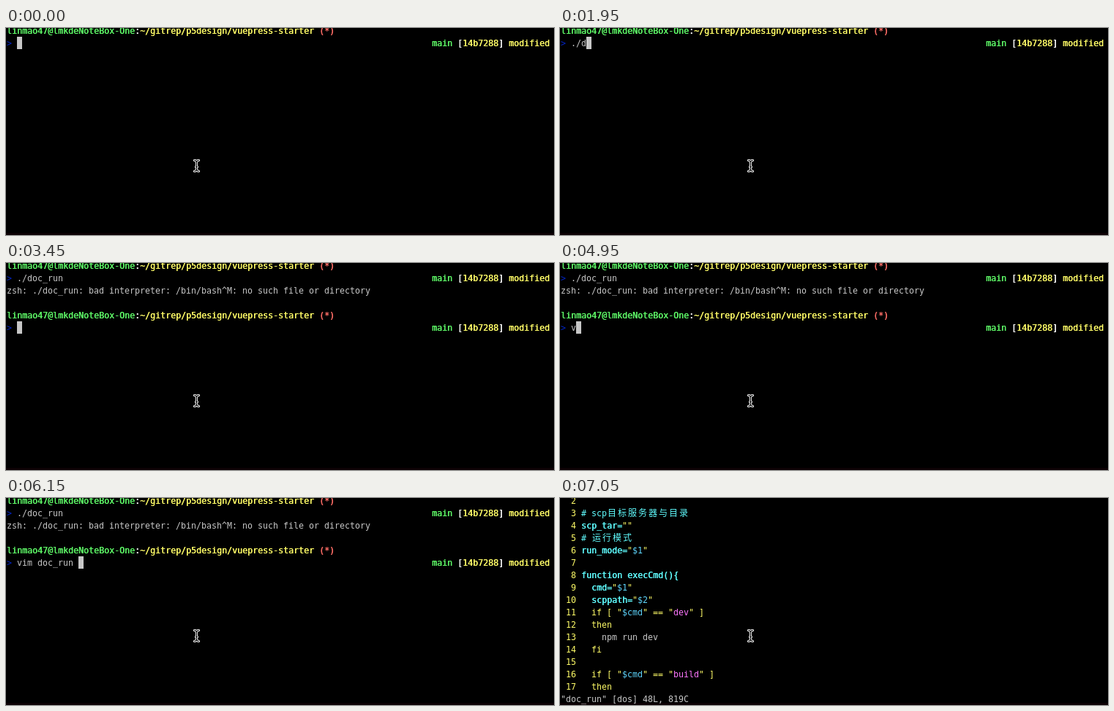
An HTML page with a canvas that plays this animation: 749 by 284 pixels, repeating every 8000 ms.

```html
<!DOCTYPE html>
<html lang="en">
<head>
<meta charset="utf-8">
<title>Terminal session</title>
<style>
  html, body { margin: 0; width: 100%; height: 100%; overflow: hidden; background: #000; }
  canvas { display: block; width: 749px; height: 284px; }
</style>
</head>
<body>
<canvas id="stage" width="749" height="284"></canvas>
<script>
const ctx = document.getElementById('stage').getContext('2d');
const LOOP = 8000, CELL = 7, LINE = 17;
const MONO = '11.63px "DejaVu Sans Mono", monospace';
const WIDE = '12px "Noto Sans CJK SC", "Noto Sans CJK", sans-serif';

// [colour, bold]
const STYLE = {
  text: ['#c7c7c7'],
  prompt: ['#0225c7'],
  user: ['#5ffa68', true],
  path: ['#fffc67', true],
  dirty: ['#ff6e67', true],
  bracket: ['#ffffff', true],
  key: ['#fffc67'],
  note: ['#60fdff'],
  name: ['#60fdff', true],
  arg: ['#5fd7ff'],
  str: ['#ff77ff']
};

const cellX = col => 1 + col * CELL;
const rowY = row => row * LINE - 5;

// Draws [style, text] pairs on the character grid.
function write(row, col, ...parts) {
  const y = rowY(row) + 13;
  for (const [style, text] of parts) {
    const [color, bold] = STYLE[style];
    ctx.fillStyle = color;
    for (const ch of text) {
      const wide = ch > '\u2e80';
      const x = cellX(col) + (wide ? 1 : 0);
      ctx.font = wide ? WIDE : MONO;
      ctx.fillText(ch, x, y);
      if (bold) ctx.fillText(ch, x + 0.5, y);
      col += wide ? 2 : 1;
    }
  }
}

function cursor(row, col) {
  ctx.fillStyle = '#c7c7c7';
  ctx.fillRect(cellX(col), rowY(row), CELL, LINE);
}

function prompt(row, command) {
  write(row, 0, ['user', 'linmao47@lmkdeNoteBox-One'], ['bracket', ':'],
    ['path', '~/gitrep/p5design/vuepress-starter '], ['dirty', '(*)']);
  write(row + 1, 0, ['prompt', '> '], ['text', command]);
  write(row + 1, 83, ['user', 'main '], ['bracket', '['], ['path', '14b7288'],
    ['bracket', '] '], ['path', 'modified']);
}

// Number of characters typed so far, from [time, count] steps.
const typed = (steps, t) => steps.reduce((n, [at, count]) => t >= at ? count : n, 0);

const RUN = './doc_run ', EDIT = 'vim doc_run ';
const RUN_STEPS = [[750, 1], [1200, 2], [1950, 3], [2250, 4], [2400, 5], [2700, 10]];
const EDIT_STEPS = [[4950, 1], [5100, 2], [5250, 3], [5400, 4], [5700, 6], [5850, 7], [6150, 12]];

function shell(t) {
  const run = typed(RUN_STEPS, t);
  prompt(0, RUN.slice(0, run));
  if (t < 3300) return cursor(1, 2 + run);
  write(2, 0, ['text', 'zsh: ./doc_run: bad interpreter: /bin/bash^M: no such file or directory']);
  if (t < 3450) return cursor(3, 0);
  const edit = typed(EDIT_STEPS, t);
  prompt(4, EDIT.slice(0, edit));
  if (t < 6900) cursor(5, 2 + edit);
  else cursor(6, 0);
}

const assign = (name, value) => [['name', name + '='], ['key', '"'], ['arg', value], ['key', '"']];
const test = value => [['key', '  if [ "'], ['arg', '$cmd'], ['key', '" == "'],
  ['str', value], ['key', '" ]']];

const SCRIPT = [
  [],
  [['note', '# scp目标服务器与目录']],
  assign('scp_tar', ''),
  [['note', '# 运行模式']],
  assign('run_mode', '$1'),
  [],
  [['name', 'function execCmd(){']],
  assign('  cmd', '$1'),
  assign('  scppath', '$2'),
  test('dev'),
  [['key', '  then']],
  [['text', '    npm run dev']],
  [['key', '  fi']],
  [],
  test('build'),
  [['key', '  then']]
];

function editor() {
  SCRIPT.forEach((parts, row) =>
    write(row, 0, ['key', String(row + 2).padStart(3) + ' '], ...parts));
  write(16, 0, ['text', '"doc_run" [dos] 48L, 819C']);
}

const beam = new Path2D('M257.5 181.5 Q260.5 181.5 260.5 185 Q260.5 181.5 263.5 181.5' +
  'M260.5 185 V193 M257.5 196.5 Q260.5 196.5 260.5 193 Q260.5 196.5 263.5 196.5' +
  'M259.5 190.5 H261.5');

function pointer() {
  ctx.lineCap = ctx.lineJoin = 'round';
  for (const [color, width] of [['#fff', 3.2], ['#000', 1.2]]) {
    ctx.strokeStyle = color;
    ctx.lineWidth = width;
    ctx.stroke(beam);
  }
}

function draw(now) {
  const t = now % LOOP;
  ctx.fillStyle = '#000';
  ctx.fillRect(0, 0, 749, 284);
  ctx.fillStyle = '#0d0205';
  ctx.fillRect(0, 281, 749, 3);
  if (t < 7050) shell(t);
  else editor();
  pointer();
}

const start = performance.now();
function tick() {
  draw(performance.now() - start);
  requestAnimationFrame(tick);
}
tick();
</script>
</body>
</html>
```
